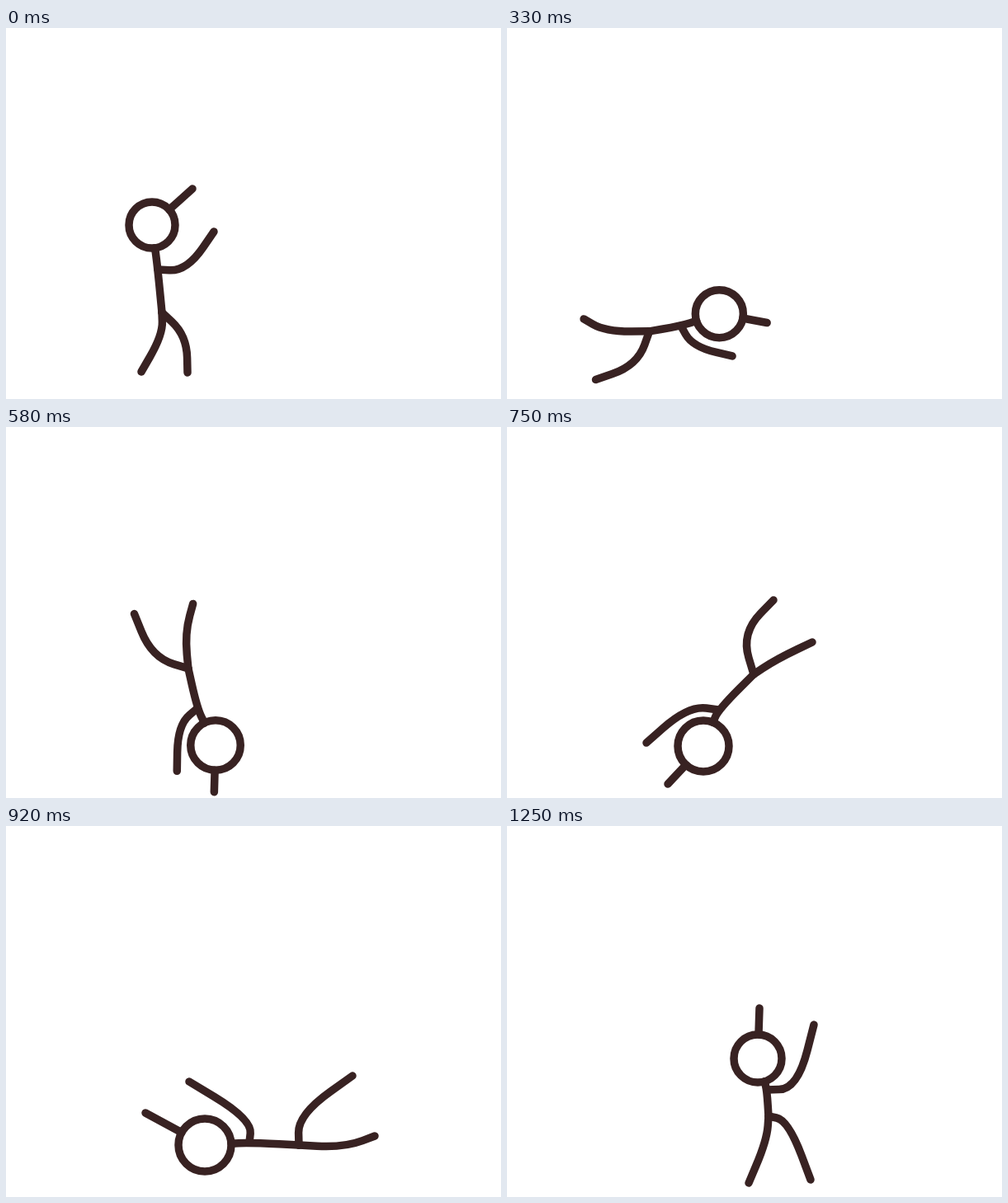
Recreate the animation shown at these times as an HTML page with a canvas. Size 600 by 450 pixels, loop 1330 ms.

```html
<!DOCTYPE html>
<html lang="en">
<head>
<meta charset="utf-8">
<title>Handspring</title>
<style>
  html, body { margin: 0; width: 100%; height: 100%; overflow: hidden; background: #fff; }
  canvas { display: block; width: 600px; height: 450px; }
</style>
</head>
<body>
<canvas id="stage" width="600" height="450"></canvas>
<script>
const ctx = document.getElementById('stage').getContext('2d');
const LOOP = 1330, STEPS = 16, ROUNDING = 0.6;

const mix = (a, b, k) => a + (b - a) * k;
const mixPt = (p, q, k) => [mix(p[0], q[0], k), mix(p[1], q[1], k)];
const sub = (p, q) => [p[0] - q[0], p[1] - q[1]];
const add = (p, q) => [p[0] + q[0], p[1] + q[1]];
const spin = ([x, y], a) => [
  x * Math.cos(a) - y * Math.sin(a),
  x * Math.sin(a) + y * Math.cos(a)
];

// A pose keeps its joints relative to the head and the body angle.
// The angle only grows, so the figure always tumbles forward.
let lastAngle = 0;
function pose(step, head, r, points) {
  const [dx, dy] = sub(points.hip, head);
  let angle = Math.atan2(dy, dx);
  while (angle < lastAngle) angle += 2 * Math.PI;
  lastAngle = angle;
  const joints = {};
  for (const name in points) joints[name] = spin(sub(points[name], head), -angle);
  return { step, head, r, angle, joints };
}

const keys = [
  // standing, arms up
  pose(0, [177, 239], 28, {
    shoulder: [184, 293], hip: [189, 345], farHand: [226, 195],
    elbow: [219, 295], hand: [252, 247],
    leadKnee: [190, 372], leadFoot: [164, 417],
    trailKnee: [219, 373], trailFoot: [220, 418]
  }),
  // leaning forward
  pose(2, [232, 270], 28, {
    shoulder: [226, 311], hip: [210, 346], farHand: [261, 202],
    elbow: [262, 308], hand: [297, 262],
    leadKnee: [178, 388], leadFoot: [144, 408],
    trailKnee: [243, 386], trailFoot: [219, 421]
  }),
  // hands to the floor
  pose(5, [270, 385], 29.5, {
    shoulder: [219, 372], hip: [182, 360], farHand: [303, 428],
    elbow: [217, 398], hand: [248, 431],
    leadKnee: [134, 337], leadFoot: [121, 314],
    trailKnee: [152, 386], trailFoot: [91, 383]
  }),
  // past the handstand
  pose(9, [238, 387], 31, {
    shoulder: [256, 343], hip: [299, 300], farHand: [195, 433],
    elbow: [220, 338], hand: [169, 383],
    leadKnee: [326, 282], leadFoot: [370, 261],
    trailKnee: [284, 250], trailFoot: [323, 210]
  }),
  // flat on the back
  pose(11, [241, 387], 32, {
    shoulder: [295, 384], hip: [355, 387], farHand: [169, 348],
    elbow: [298, 356], hand: [222, 310],
    leadKnee: [410, 390], leadFoot: [447, 376],
    trailKnee: [354, 350], trailFoot: [420, 303]
  }),
  // rising
  pose(13, [254, 303], 32.5, {
    shoulder: [287, 332], hip: [315, 362], farHand: [254, 227],
    elbow: [320, 306], hand: [335, 240],
    leadKnee: [330, 389], leadFoot: [329, 428],
    trailKnee: [385, 360], trailFoot: [406, 404]
  }),
  // upright again
  pose(15, [304, 282], 29, {
    shoulder: [315, 320], hip: [317, 352], farHand: [306, 221],
    elbow: [352, 319], hand: [372, 241],
    leadKnee: [315, 381], leadFoot: [293, 433],
    trailKnee: [341, 357], trailFoot: [368, 429]
  })
];

function figureAt(step) {
  let i = 0;
  while (i < keys.length - 2 && step >= keys[i + 1].step) i++;
  const a = keys[i], b = keys[i + 1];
  const k = (step - a.step) / (b.step - a.step);
  const head = mixPt(a.head, b.head, k);
  const angle = mix(a.angle, b.angle, k);
  const fig = { head, r: mix(a.r, b.r, k) };
  for (const name in a.joints) {
    fig[name] = add(head, spin(mixPt(a.joints[name], b.joints[name], k), angle));
  }
  return fig;
}

// Two bones with a rounded joint.
function limb(from, joint, to) {
  ctx.beginPath();
  ctx.moveTo(...from);
  ctx.lineTo(...mixPt(joint, from, ROUNDING));
  ctx.quadraticCurveTo(...joint, ...mixPt(joint, to, ROUNDING));
  ctx.lineTo(...to);
  ctx.stroke();
}

function drawFigure(f) {
  const rim = p => {
    const [dx, dy] = sub(p, f.head);
    return mixPt(f.head, p, f.r / Math.hypot(dx, dy));
  };
  ctx.beginPath();
  ctx.arc(...f.head, f.r, 0, 2 * Math.PI);
  ctx.stroke();
  limb(rim(f.shoulder), f.shoulder, f.hip);
  limb(rim(f.farHand), f.farHand, f.farHand);
  limb(f.shoulder, f.elbow, f.hand);
  limb(f.hip, f.leadKnee, f.leadFoot);
  limb(f.hip, f.trailKnee, f.trailFoot);
}

// Steps start on whole hundredths of a second.
const stepStart = i => Math.round(i * LOOP / STEPS / 10) * 10;

function draw(t) {
  let step = STEPS - 1;
  while (step > 0 && t < stepStart(step)) step--;
  ctx.fillStyle = '#fff';
  ctx.fillRect(0, 0, 600, 450);
  ctx.strokeStyle = '#382222';
  ctx.lineWidth = 9.5;
  ctx.lineCap = ctx.lineJoin = 'round';
  drawFigure(figureAt(step));
}

const start = performance.now();
function loop() {
  draw((performance.now() - start) % LOOP);
  requestAnimationFrame(loop);
}
loop();
</script>
</body>
</html>
```
